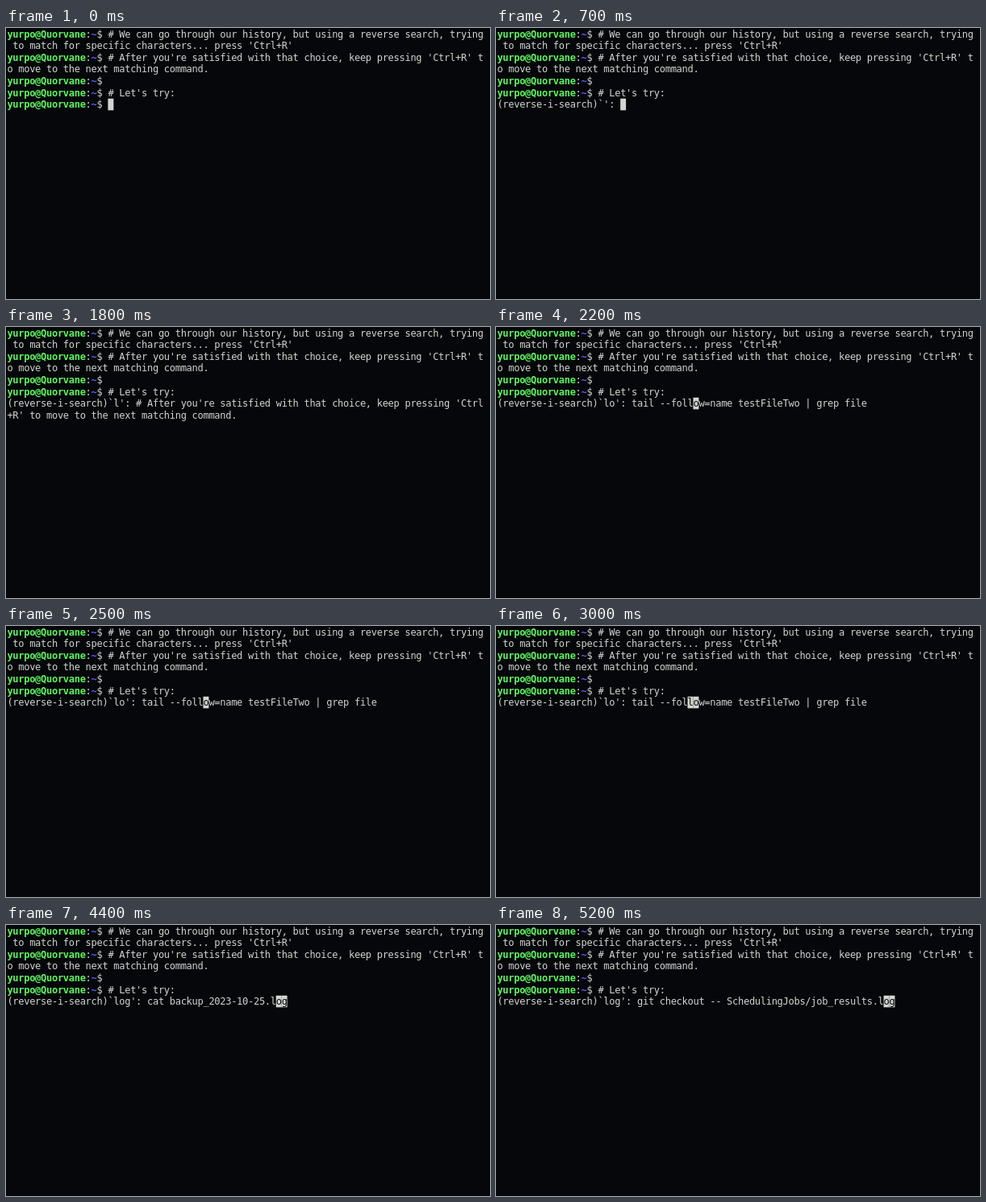
An HTML page with a canvas for the animation above (5.3 s loop, 600 by 337 pixels).

```html
<!DOCTYPE html>
<html lang="en">
<head>
<meta charset="utf-8">
<title>Reverse search</title>
<style>
  html, body { margin: 0; width: 100%; height: 100%; overflow: hidden; background: #05070a; }
  canvas { display: block; }
</style>
</head>
<body>
<canvas id="term" width="600" height="337"></canvas>
<script>
const ctx = document.getElementById('term').getContext('2d');
const LOOP = 5300, BLINK = 600;
// Terminal metrics in the pixels of an 864 x 486 window
const SCALE = 600 / 864, PAD_X = 2, PAD_Y = 0.36;
const COLS = 85, CELL_W = 10, CELL_H = 21, BASE = 16.5;
const BG = '#05070a', FG = '#d3d5d0', GREEN = '#5ff55f', BLUE = '#5c5cf4';
const FONT = '17.33px "DejaVu Sans Mono", monospace';

const host = 'yurpo@Quorvane';
const intro = "# We can go through our history, but using a reverse search, trying to match for specific characters... press 'Ctrl+R'";
const hint = "# After you're satisfied with that choice, keep pressing 'Ctrl+R' to move to the next matching command.";
const history = [intro, hint, '', "# Let's try:"];

// What the bottom line shows from each moment on
const states = [
  { at: 0 },
  { at: 200, typed: '', match: '' },
  { at: 1600, typed: 'l', match: hint },
  { at: 2000, typed: 'lo', match: 'tail --follow=name testFileTwo | grep file' },
  { at: 3100, typed: 'log', match: 'vim backup_2023-10-25.log' },
  { at: 4300, typed: 'log', match: 'cat backup_2023-10-25.log' },
  { at: 4700, typed: 'log', match: 'git checkout -- SchedulingJobs/job_results.log' }
];
// Every key press, a lone Ctrl included, restarts the blink
const keys = [...states.map(s => s.at), 4000].sort((a, b) => a - b);

const span = (text, color = FG, bold = false) =>
  [...text].map(ch => ({ ch, color, bold, inverse: false }));

const promptLine = text => [
  ...span(host, GREEN, true), ...span(':'), ...span('~', BLUE, true), ...span('$ ' + text)
];

function searchLine({ typed, match }, cursorOn) {
  const lead = "(reverse-i-search)`" + typed + "': ";
  const cells = span(lead + match);
  const start = lead.length + match.lastIndexOf(typed);
  for (let i = 0; i < typed.length; i++) cells[start + i].inverse = true;
  return withCursor(cells, start, cursorOn);
}

function withCursor(cells, col, on) {
  if (col === cells.length) cells.push(...span(' '));
  if (on) cells[col].inverse = !cells[col].inverse;
  return cells;
}

// Draws one logical line and returns the row after it
function drawLine(cells, row) {
  const place = i => [i % COLS * CELL_W, (row + Math.floor(i / COLS)) * CELL_H];
  cells.forEach((cell, i) => {
    if (!cell.inverse) return;
    const [x, y] = place(i);
    ctx.fillStyle = FG;
    ctx.fillRect(x, y, CELL_W, CELL_H);
  });
  cells.forEach((cell, i) => {
    if (cell.ch === ' ') return;
    const [x, y] = place(i);
    ctx.font = (cell.bold ? 'bold ' : '') + FONT;
    ctx.fillStyle = cell.inverse ? BG : cell.color;
    ctx.fillText(cell.ch, x, y + BASE);
  });
  return row + Math.ceil(cells.length / COLS);
}

function draw(t) {
  const state = states.findLast(s => s.at <= t);
  const lastKey = keys.findLast(k => k <= t);
  const cursorOn = Math.floor((t - lastKey) / BLINK) % 2 === 0;

  ctx.setTransform(1, 0, 0, 1, 0, 0);
  ctx.fillStyle = BG;
  ctx.fillRect(0, 0, 600, 337);
  ctx.scale(SCALE, SCALE);
  ctx.translate(PAD_X, PAD_Y);

  let row = 0;
  for (const text of history) row = drawLine(promptLine(text), row);
  const prompt = promptLine('');
  drawLine(state.match === undefined
    ? withCursor(prompt, prompt.length, cursorOn)
    : searchLine(state, cursorOn), row);
}

const began = performance.now();
function tick() {
  draw((performance.now() - began) % LOOP);
  requestAnimationFrame(tick);
}
tick();
</script>
</body>
</html>
```
